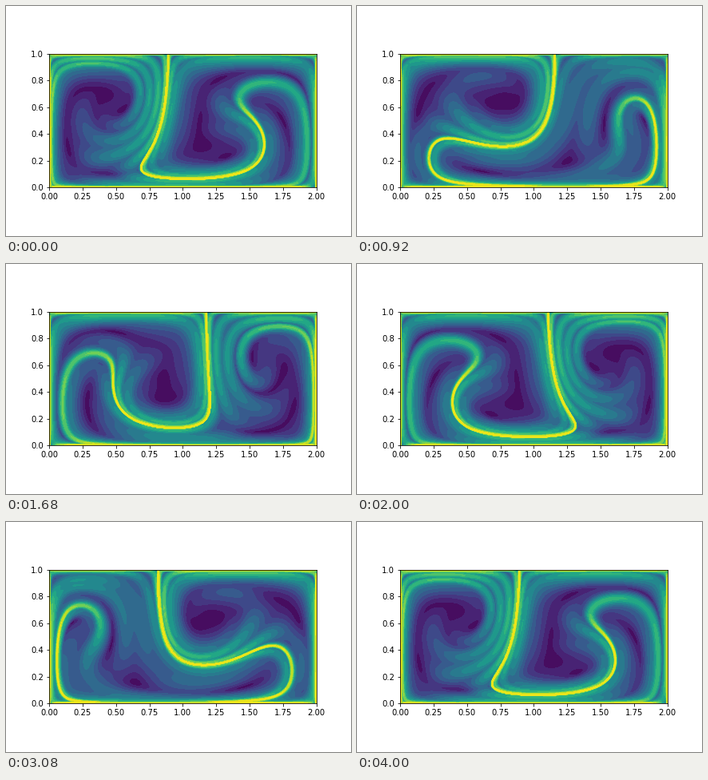
Write a matplotlib script that moves like this. It is 432x288 px and loops after 4040 ms.

```python
import math

import matplotlib.pyplot as plt
import numpy as np
from matplotlib.animation import FuncAnimation

# Backward-time FTLE field of the periodically forced double gyre
AMP, EPS, PERIOD = 0.1, 0.25, 10.0
OMEGA = 2 * math.pi / PERIOD
SPAN, STEPS = 10.0, 25
FRAMES, HALF = 101, 50
NX, NY = 301, 151
LEVELS = np.linspace(0, 0.48, 17)

xs = np.linspace(0, 2, NX, dtype=np.float32)
ys = np.linspace(0, 1, NY, dtype=np.float32)
X0, Y0 = np.meshgrid(xs, ys)


def velocity(t, x, y):
    a = EPS * math.sin(OMEGA * t)
    b = 1 - 2 * a
    pf = (math.pi * a * x + math.pi * b) * x
    py = math.pi * y
    speed = math.pi * AMP
    u = -speed * np.sin(pf) * np.cos(py)
    v = speed * np.cos(pf) * np.sin(py) * (2 * a * x + b)
    return u, v


def flow_back(t):
    """Carry the grid from time t back to t - SPAN with RK4."""
    x, y = X0, Y0
    h = -SPAN / STEPS
    for _ in range(STEPS):
        u1, v1 = velocity(t, x, y)
        u2, v2 = velocity(t + h / 2, x + h / 2 * u1, y + h / 2 * v1)
        u3, v3 = velocity(t + h / 2, x + h / 2 * u2, y + h / 2 * v2)
        u4, v4 = velocity(t + h, x + h * u3, y + h * v3)
        x = x + h / 6 * (u1 + 2 * (u2 + u3) + u4)
        y = y + h / 6 * (v1 + 2 * (v2 + v3) + v4)
        t += h
    return x, y


def ftle(t):
    x, y = flow_back(t)
    dx, dy = 2 / (NX - 1), 1 / (NY - 1)
    x_y, x_x = np.gradient(x, dy, dx)
    y_y, y_x = np.gradient(y, dy, dx)
    c11 = x_x**2 + y_x**2
    c12 = x_x * x_y + y_x * y_y
    c22 = x_y**2 + y_y**2
    top = (c11 + c22) / 2 + np.sqrt(((c11 - c22) / 2) ** 2 + c12**2)
    sigma = np.log(np.maximum(top, 1)) / (2 * SPAN)
    return np.clip(sigma, 0.001, 0.479)


# Half a period later the flow is its own mirror image
fields = [ftle(PERIOD / 2 * k / HALF) for k in range(HALF)]

fig, ax = plt.subplots(figsize=(6, 4), dpi=72)
fig.subplots_adjust(left=0.125, right=0.9, bottom=0.125, top=0.88)
ax.set_aspect("equal")
ax.set_xlim(0, 2)
ax.set_ylim(0, 1)
shown = []


def draw(i):
    while shown:
        shown.pop().remove()
    field = fields[i % HALF]
    if (i // HALF) % 2:
        field = field[:, ::-1]
    shown.append(ax.contourf(xs, ys, field, levels=LEVELS, cmap="viridis"))
    return shown


anim = FuncAnimation(fig, draw, frames=FRAMES, interval=40, repeat=True,
                     repeat_delay=0, blit=False)
plt.show()
```
